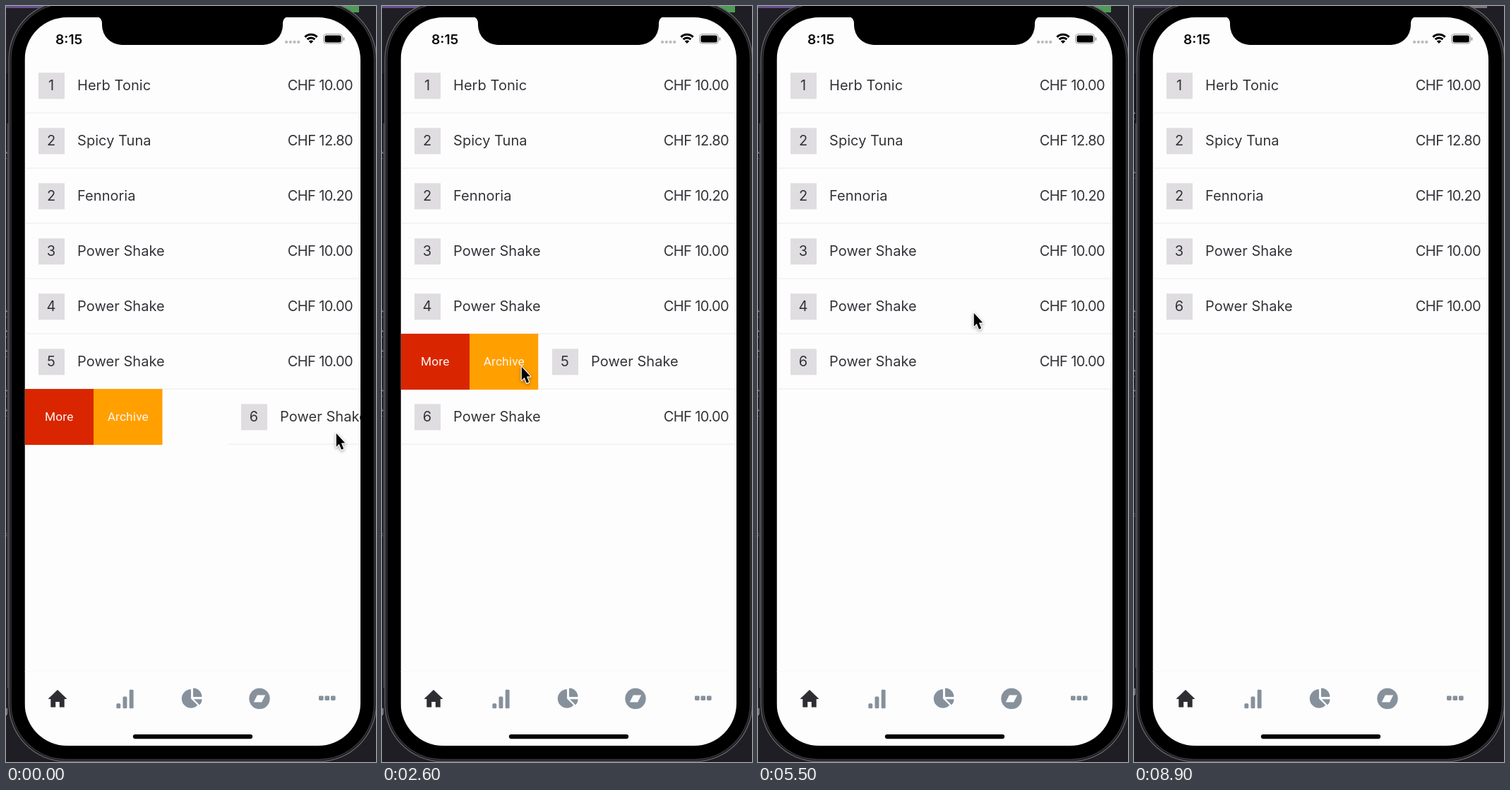
Recreate the animation shown at these times as an HTML page with a canvas. Size 524 by 1068 pixels, loop 9200 ms.

```html
<!DOCTYPE html>
<html lang="en">
<head>
<meta charset="utf-8">
<title>Swipe list</title>
<style>
  html, body { margin: 0; width: 100%; height: 100%; overflow: hidden; background: #1f1e25; }
  canvas { display: block; width: 524px; height: 1068px; }
</style>
</head>
<body>
<canvas id="stage"></canvas>
<script>
const W = 524, H = 1068, LOOP = 9200;
const L = 26.5, R = 502, TOP = 74, ROW = 78, BTN = 97.5;
const OPEN = 2 * BTN, AWAY = -475, COLLAPSE = 320;
const RED = '#d92600', ORANGE = '#ffa000', INK = '#343338', GREY = '#87919c', PAPER = '#fefdfe';
const SANS = 'Inter, "Liberation Sans", sans-serif';

const canvas = document.getElementById('stage');
const g = canvas.getContext('2d');
const dpr = window.devicePixelRatio || 1;
canvas.width = W * dpr;
canvas.height = H * dpr;

// swipe: [time, offset] keys; a row swiped fully away collapses afterwards
const item = (n, name, price = '10.00', swipe = [[0, 0], [1, 0]]) => ({ n, name, price, swipe });
const shake = (n, swipe) => item(n, 'Power Shake', '10.00', swipe);
const rows = [
  item(1, 'Herb Tonic'),
  item(2, 'Spicy Tuna', '12.80'),
  item(2, 'Fennoria', '10.20'),
  shake(3),
  shake(4, [[5620, 0], [6118, AWAY]]),
  shake(5, [[1600, 0], [2260, OPEN], [2620, OPEN], [2950, 0], [3373, 0], [4050, AWAY]]),
  shake(6, [[0, 287], [1040, 0]])
];

// [time, x, y]
const pointer = [
  [0, 467, 602], [1000, 155, 605], [1600, 62, 512], [2300, 197, 508], [2600, 197, 508],
  [2950, 60, 506], [3400, 465, 504], [3900, 420, 503], [5500, 305, 432], [6100, 333, 423],
  [7150, -30, 470]
];

const ease = u => u * u * (3 - 2 * u);
const clamp = u => Math.max(0, Math.min(1, u));

function track(keys, t) {
  let i = 0;
  while (i < keys.length - 2 && t > keys[i + 1][0]) i++;
  const a = keys[i], b = keys[i + 1];
  const u = ease(clamp((t - a[0]) / (b[0] - a[0])));
  return a.slice(1).map((v, k) => v + (b[k + 1] - v) * u);
}

function rect(x, y, w, h, color) {
  g.fillStyle = color;
  g.fillRect(x, y, w, h);
}

function round(x, y, w, h, r, color) {
  g.beginPath();
  g.roundRect(x, y, w, h, r);
  g.fillStyle = color;
  g.fill();
}

function poly(points, color) {
  g.beginPath();
  points.forEach(([x, y]) => g.lineTo(x, y));
  g.closePath();
  g.fillStyle = color;
  g.fill();
}

function sector(x, y, r, from, to, color) {
  g.beginPath();
  g.moveTo(x, y);
  g.arc(x, y, r, from * Math.PI / 180, to * Math.PI / 180);
  g.closePath();
  g.fillStyle = color;
  g.fill();
}

function text(s, x, y, font, color, align = 'left', spacing = 0) {
  g.font = font;
  g.fillStyle = color;
  g.textAlign = align;
  g.letterSpacing = spacing + 'px';
  g.fillText(s, x, y);
}

function clipTo(x, y, w, h) {
  g.beginPath();
  g.rect(x, y, w, h);
  g.clip();
}

// editor window peeking out behind the phone
function backdrop(t) {
  const late = t >= 7500, line = 28, shift = late ? -line : 0;
  rect(0, 0, W, H, '#1f1e25');
  rect(0, 0, 136, 3, t < 6400 ? '#66508a' : '#3b3348');
  if (t < 6400) rect(470, 0, 30, 9, '#4f9a56');
  else rect(470, 0, 30, 3, '#77757b');
  rect(0, 95, 5, 70, '#17161c');
  rect(2, 166, 1, 797 + shift, '#56545c');
  for (const k of late ? [-2, 1, 8, 9, 11, 12] : [0, 8, 9, 10, 12, 13])
    text('t', -3, 216 + k * line, 'italic 15px ' + SANS, '#8f7cc4');
  text('=', -7, 751 + shift, '15px ' + SANS, '#6d6b73');
  text('U', -8, 1003 + shift, '15px ' + SANS, '#a5a4a9');
}

function phoneBody() {
  ['#626166', '#17171a', '#39383c', '#000'].forEach((color, i) => {
    const d = i * 1.4;
    round(3.5 + d, -7 + d, 521.5 - 2 * d, 1075 - 2 * d, 82 - d, color);
  });
}

function statusBar() {
  // notch with flared upper corners
  g.beginPath();
  g.moveTo(128, 15);
  g.quadraticCurveTo(136, 16, 136, 25);
  g.arcTo(136, 55, 166, 55, 28);
  g.arcTo(392, 55, 392, 25, 28);
  g.lineTo(392, 25);
  g.quadraticCurveTo(392, 16, 400, 15);
  g.fillStyle = '#000';
  g.fill();

  text('8:15', 70, 53.5, '600 19.2px ' + SANS, '#0c0c0e');
  for (let i = 0; i < 4; i++) round(395 + i * 5.7, 48.8, 4.2, 4.2, 2, '#bcbbc0');

  g.strokeStyle = '#000';
  g.lineWidth = 3;
  for (const r of [7.6, 12.2]) {
    g.beginPath();
    g.arc(432, 52.5, r, -Math.PI * 0.75, -Math.PI * 0.25);
    g.stroke();
  }
  sector(432, 53, 4.6, -135, -45, '#000');

  g.beginPath();
  g.roundRect(449.8, 39.8, 26.6, 13.2, 4);
  g.strokeStyle = '#96959a';
  g.lineWidth = 1.1;
  g.stroke();
  round(451.5, 41.4, 23.2, 10, 2.5, '#000');
  round(477.6, 44.2, 1.7, 4.6, 1, '#96959a');
}

function tabBar() {
  rect(L, 940, R - L, 1, '#faf9fb');

  poly([[73, 966], [86.5, 979], [59.5, 979]], '#2e2d31');
  rect(63.3, 978, 19.4, 12.6, '#2e2d31');
  rect(70.2, 983, 5.6, 8, PAPER);

  for (let i = 0; i < 3; i++) {
    const h = 7 + i * 9.8;
    round(156.3 + i * 9.2, 992.3 - h, 5.9, h, 1.5, GREY);
  }

  sector(262, 978.5, 13.2, 45, 270, GREY);
  sector(265, 976, 12.5, -90, 0, GREY);
  sector(266, 979.3, 11.5, 0, 45, GREY);

  sector(359, 978.5, 14.7, 0, 360, GREY);
  poly([[355.8, 973.5], [367.2, 973.5], [362.2, 983.5], [350.8, 983.5]], PAPER);

  for (let i = 0; i < 3; i++) round(443 + i * 8.5, 974.6, 6.6, 6.4, 1.4, GREY);
  round(179.8, 1029, 169.4, 6.2, 3.1, '#000');
}

// buttons lie still while the row content slides off them
function leftActions(y, off) {
  g.save();
  clipTo(L, y, off, ROW + 1);
  [['More', RED], ['Archive', ORANGE]].forEach(([label, color], i) => {
    const x = L + i * BTN;
    rect(x, y, BTN, ROW + 1, color);
    text(label, x + BTN / 2, y + 45.3, '17.3px Roboto, sans-serif', '#fff6ee', 'center', 0.15);
  });
  g.restore();
}

function deleteAction(y, off) {
  const x = R + off;
  g.save();
  clipTo(x, y, R - x, ROW + 1);
  rect(x, y, R - x, ROW + 1, RED);
  g.strokeStyle = '#fff4ef';
  g.lineWidth = 2.1;
  g.beginPath();
  g.arc(467.5, y + 39.5, 12.4, 0, Math.PI * 2);
  g.moveTo(461.5, y + 39.5);
  g.lineTo(473.5, y + 39.5);
  g.stroke();
  g.restore();
}

function drawRow(row, y, h, off) {
  const font = '20px ' + SANS, base = y + 45.3;
  g.save();
  clipTo(L, y - 1, R - L, h + 1);
  if (off > 0) leftActions(y - 1, off);
  g.save();
  g.translate(off, 0);
  rect(46, y + 20.3, 37, 37, '#dfdde0');
  text(row.n, 64, base, font, INK, 'center');
  text(row.name, 101, base, font, INK, 'left', 0.05);
  text('CHF ' + row.price, 491, base, font, INK, 'right', -0.6);
  rect(L, y + h - 1.5, R - L, 1, '#ecebee');
  g.restore();
  if (off < 0) deleteAction(y - 1, off);
  g.restore();
}

function list(t) {
  let y = TOP;
  for (const row of rows) {
    const [end, last] = row.swipe[row.swipe.length - 1];
    const gone = last === AWAY ? ease(clamp((t - end - 50) / COLLAPSE)) : 0;
    if (gone === 1) continue;
    const h = ROW * (1 - gone);
    drawRow(row, y, h, track(row.swipe, t)[0]);
    y += h;
  }
}

function cursor(t) {
  const [x, y] = track(pointer, t);
  g.save();
  g.translate(x + 0.8, y + 1.8);
  g.scale(0.86, 0.92);
  g.beginPath();
  [[0, 0], [0, 20.5], [4.6, 16.3], [8.4, 25], [12, 23.4], [8.3, 15], [14.4, 14.6]]
    .forEach(([px, py]) => g.lineTo(px, py));
  g.closePath();
  g.lineJoin = 'round';
  g.lineWidth = 2.6;
  g.strokeStyle = '#fff';
  g.shadowColor = 'rgba(0,0,0,.4)';
  g.shadowBlur = 4 * dpr;
  g.shadowOffsetY = 1.5 * dpr;
  g.stroke();
  g.shadowColor = 'transparent';
  g.fillStyle = '#000';
  g.fill();
  g.restore();
}

function draw(now) {
  const t = now % LOOP;
  g.setTransform(dpr, 0, 0, dpr, 0, 0);
  backdrop(t);
  phoneBody();
  g.save();
  g.beginPath();
  g.roundRect(L, 16, R - L, 1029, 60);
  g.clip();
  rect(L, 16, R - L, 1029, PAPER);
  list(t);
  tabBar();
  statusBar();
  g.restore();
  cursor(t);
}

let start;
function tick(now) {
  if (start === undefined) start = now;
  draw(now - start);
  requestAnimationFrame(tick);
}
draw(0);
requestAnimationFrame(tick);
</script>
</body>
</html>
```
